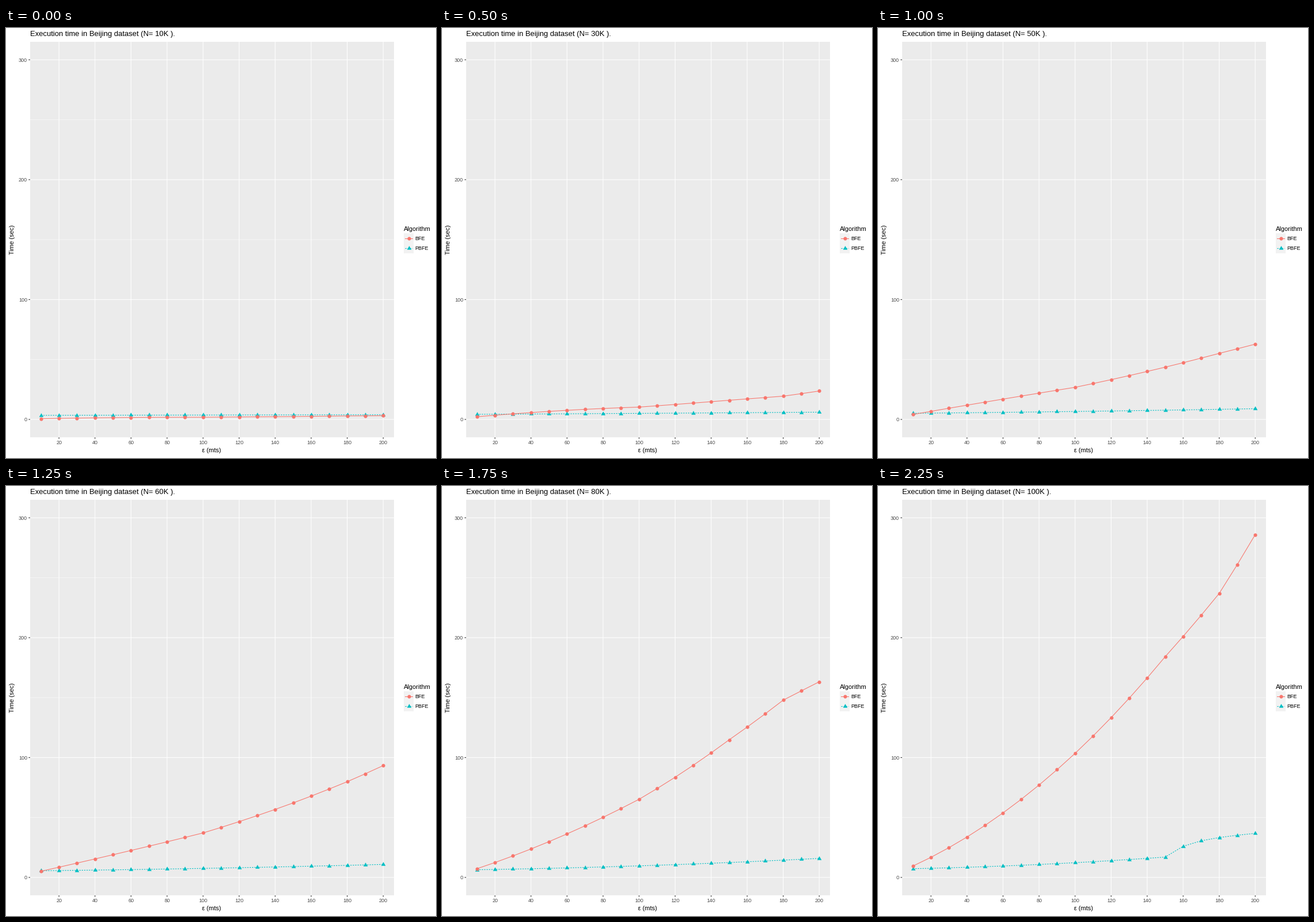
Animation, 748 px wide and 748 px high, one loop 2500 ms. Source, as a matplotlib script:

```python
import numpy as np
import matplotlib.pyplot as plt
from matplotlib.animation import FuncAnimation
from matplotlib.patches import Rectangle

SIZE, DPI = 748, 68
PT = 72 / DPI  # points per pixel
RED, TEAL = "#F8766D", "#00BFC4"
LEFT, RIGHT, TOP, BOTTOM = 42, 675, 24, 712

plt.rcParams["font.family"] = ["Liberation Sans", "DejaVu Sans"]

eps = np.arange(10, 201, 10)

# Key times in seconds: one row per size, at eps 100, 150, 180 and 200.
SIZES = [10, 30, 50, 70, 80, 90, 100]
KEY_TIMES = np.array([
    [1.8, 2.4, 2.9, 3.1],
    [10.3, 16, 19.4, 23.7],
    [26.8, 43.6, 55.1, 62.8],
    [48.9, 83.9, 109.3, 130.4],
    [65.2, 114.8, 147.9, 163.2],
    [82, 149.1, 183.4, 226.8],
    [103.5, 184.1, 236.9, 286],
])


def bfe(n):
    """A fixed cost plus a rate per metre that rises between the key points."""
    fixed = 0.03 * n
    later = [np.exp(np.interp(np.log(n), np.log(SIZES), np.log(col)))
             for col in KEY_TIMES.T]
    keys = np.array([10, 100, 150, 180, 200])
    seconds = np.array([9.5 * (n / 100) ** 1.2, *later])
    return fixed + eps * np.interp(eps, keys, (seconds - fixed) / keys)


def pbfe(n):
    """Gentle growth, with a saturating jump for large sizes and wide eps."""
    m = n / 100
    base = 3 + 4 * m + 0.026 * m * eps + 0.00027 * m ** 3 * eps ** 2
    past = np.maximum(eps - (150 + 2.5 * (100 - n)), 0)
    return base + 14 * (1 - np.exp(-past / 12))


def px(e):
    return LEFT + (e / 10 - 0.4) * (RIGHT - LEFT) / 20.2


def py(sec):
    return 680.9 - 2.0853 * sec


fig = plt.figure(figsize=(SIZE / DPI, SIZE / DPI), dpi=DPI, facecolor="white")
ax = fig.add_axes([0, 0, 1, 1])
ax.set(xlim=(0, SIZE), ylim=(SIZE, 0))
ax.axis("off")


def rule(xs, ys, color, width):
    ax.plot(xs, ys, color=color, lw=width * PT, solid_capstyle="butt",
            snap=False, zorder=1)


def label(x, y, text, size, color="black", **kw):
    return ax.text(x, y, text, fontsize=size * PT, color=color, va="baseline", **kw)


def box(x, y, w, h, color):
    ax.add_patch(Rectangle((x, y), w, h, fc=color, ec="none", lw=0, zorder=0))


TRIANGLE = [(0, 1.55), (1.343, -0.775), (-1.343, -0.775), (0, 1.55)]
STYLES = {
    "BFE": dict(color=RED, ls="-", marker="o", ms=6.2 * PT, z=4),
    "PBFE": dict(color=TEAL, ls=(0, (2.1, 1.8)), marker=TRIANGLE, ms=8.8 * PT, z=3),
}


def series(name, line_x, line_y, dot_x, dot_y):
    s = STYLES[name]
    line, = ax.plot(line_x, line_y, color=s["color"], ls=s["ls"], lw=1.07 * PT,
                    dash_capstyle="butt", zorder=s["z"] - 1.5)
    dots, = ax.plot(dot_x, dot_y, color=s["color"], ls="none", marker=s["marker"],
                    ms=s["ms"], mew=0, snap=False, zorder=s["z"])
    return line, dots


# Panel, grid and axes
box(LEFT, TOP, RIGHT - LEFT, BOTTOM - TOP, "#EBEBEB")
for sec in (50, 150, 250):
    rule([LEFT, RIGHT], [py(sec)] * 2, "white", 0.53)
for sec in (0, 100, 200, 300):
    y = py(sec)
    rule([LEFT, RIGHT], [y, y], "white", 1.07)
    rule([LEFT - 2.75, LEFT], [y, y], "#333333", 1.07)
    label(37, y + 3.2, str(sec), 9, "#4D4D4D", ha="right")
for e in range(20, 201, 20):
    x = px(e)
    rule([x, x], [TOP, BOTTOM], "white", 1.07)
    rule([x, x], [BOTTOM, BOTTOM + 2.75], "#333333", 1.07)
    label(x, 724, str(e), 9, "#4D4D4D", ha="center")

title = label(LEFT, 14, "", 13)
label(358, 738, "ε (mts)", 11, ha="center")
label(13.8, 368.5, "Time (sec)", 11, ha="center", rotation=90, rotation_mode="anchor")

# Legend
label(692, 353, "Algorithm", 11)
for name, y in (("BFE", 366), ("PBFE", 383)):
    box(692, y - 8.6, 17.3, 17.3, "#F2F2F2")
    series(name, [693.8, 707.4], [y, y], [700.6], [y])
    label(711, y + 3.2, name, 9)

curves = [(series("PBFE", [], [], [], []), pbfe),
          (series("BFE", [], [], [], []), bfe)]


def draw(frame):
    n = 10 * (frame + 1)
    title.set_text(f"Execution time in Beijing dataset (N= {n}K ).")
    for artists, seconds in curves:
        for artist in artists:
            artist.set_data(px(eps), py(seconds(n)))
    return [title]


anim = FuncAnimation(fig, draw, frames=10, interval=250, repeat=True,
                     repeat_delay=0, blit=False)
plt.show()
```
